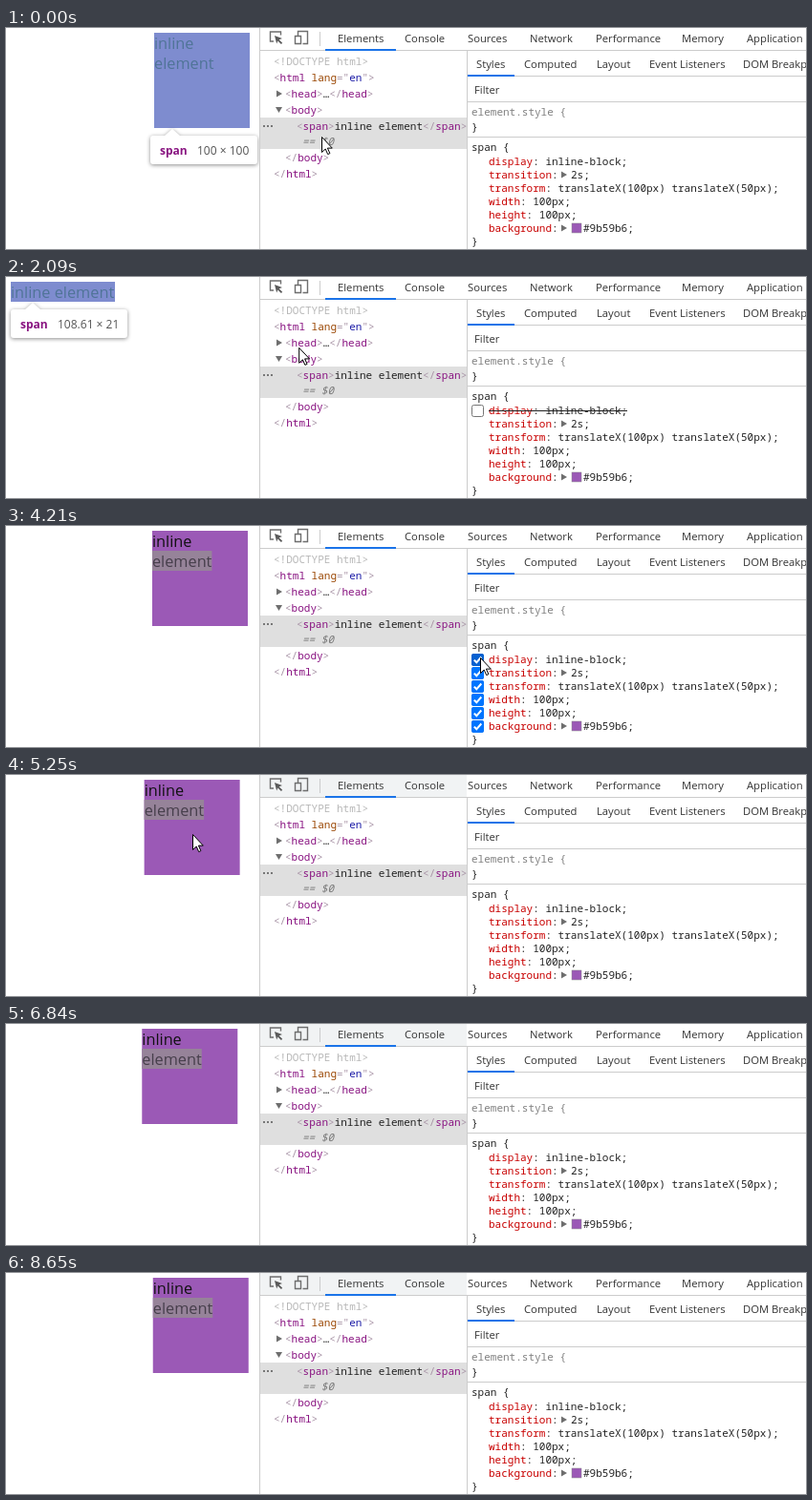
Recreate the animation shown at these times as an HTML page. Size 837 px wide and 232 px high, loop 8750 ms.

```html
<!DOCTYPE html>
<html lang="en">
<head>
<meta charset="utf-8">
<style>
  html, body { margin: 0; width: 100%; height: 100%; overflow: hidden; background: #fff; }
  svg { display: block; }
  text { white-space: pre; font: 11.25px "Open Sans", sans-serif; fill: #333; }
  .code { font: 11px "Noto Sans Mono", monospace; fill: #222; }
  .page { font-size: 16.3px; fill: #111; }
  .tip { font-size: 12px; fill: #555; }
  .bold { font-weight: bold; fill: #881280; }
  .bracket { fill: #a894a6; }
  .tag { fill: #881280; }
  .attr { fill: #994500; }
  .value { fill: #1a1aa6; }
  .prop { fill: #c80000; }
  .dim { fill: #808080; }
  .doctype { fill: #b8b8b8; }
  .note { fill: #777; font-style: italic; }
  .tooltip { filter: drop-shadow(0 1px 2px rgba(0, 0, 0, .45)); }
  .selection, .tint { display: none; }
  .selected .selection, .inspected .tint { display: inline; }
  .selected .word { fill: #463e4b; }
</style>
</head>
<body>
<svg id="stage" width="837" height="232" viewBox="0 0 837 232"></svg>
<script>
const LOOP = 8750, REST = 155, HOVERED = 105;
const stage = document.getElementById('stage');

// Markup helpers
const rect = (x, y, w, h, fill, more = '') =>
  `<rect x="${x}" y="${y}" width="${w}" height="${h}" fill="${fill}" ${more}/>`;
const path = (d, fill, more = '') => `<path d="${d}" fill="${fill}" ${more}/>`;
const label = (x, y, s, cls = '') => `<text x="${x}" y="${y}" class="${cls}">${s}</text>`;
const code = (x, y, s, cls = '') => label(x, y, s, 'code ' + cls);
const tok = (cls, s) => `<tspan class="${cls}">${s}</tspan>`;
const tag = (name, attrs = '') => {
  const close = name[0] === '/' ? '/' : '';
  return tok('bracket', '&lt;' + close) + tok('tag', name.slice(close.length)) + attrs + tok('bracket', '&gt;');
};
const right = (x, y) => path(`M${x} ${y - 3.5}l6 3.5l-6 3.5z`, '#6e6e6e');
const down = (x, y) => path(`M${x} ${y - 3}h7l-3.5 6z`, '#6e6e6e');

const toolbar = () =>
  rect(265, 0, 217, 23, '#f1f3f4', 'id="shade"') +
  rect(265, 23, 572, 1, '#ccc') + rect(483, 50, 354, 1, '#ccc') +
  rect(334, 22, 74, 2, '#1a73e8') + rect(483, 49, 49, 2, '#1a73e8') +
  path('M280 14h-3.500v-10h11v3.500', 'none', 'stroke="#6e6e6e" stroke-width="1.400"') +
  path('M281 8l8 3l-3.300 1.200l3.500 3.500l-1.300 1.300l-3.500-3.500l-1.200 3z', '#5a5a5a') +
  path('M305.500 8v-4.500h10v13h-5M302.500 8.500h6v8h-6z', 'none', 'stroke="#6e6e6e" stroke-width="1.400"') +
  rect(328, 4, 1, 15, '#ccc') +
  [[347, 'Elements'], [417, 'Console'], [483, 'Sources'], [548, 'Network'], [617, 'Performance'],
   [707, 'Memory'], [775, 'Application']].map(([x, s]) => label(x, 15, s)).join('') +
  [[492, 'Styles'], [542, 'Computed'], [618, 'Layout'], [673, 'Event Listeners'],
   [771, 'DOM Breakpoints']].map(([x, s]) => label(x, 42, s)).join('');

const tree = () =>
  rect(266, 94, 216, 33, '#dfdfdf') +
  code(280, 39, '&lt;!DOCTYPE html&gt;', 'doctype') +
  code(280, 56, tag('html', tok('attr', ' lang') + tok('bracket', '="') + tok('value', 'en') + tok('bracket', '"'))) +
  right(283, 69) + code(292, 73, tag('head') + '…' + tag('/head')) +
  down(282, 86) + code(292, 90, tag('body')) +
  [269, 273, 277].map(x => rect(x, 102, 2, 2, '#777')).join('') +
  code(304, 107, tag('span') + 'inline element' + tag('/span')) +
  code(310, 123, '== $0', 'note') +
  code(292, 140, tag('/body')) + code(280, 157, tag('/html'));

const rules = [['display', 'inline-block'], ['transition', '2s', 591],
  ['transform', 'translateX(100px) translateX(50px)'], ['width', '100px'], ['height', '100px'],
  ['background', '#9b59b6', 604]];

const checkbox = (i) => `<g id="check${i}">` +
  rect(487.5, 134.5 + 14 * i, 12, 12, '#fff', 'rx="2" stroke="#767676"') +
  `<g id="tick${i}">` + rect(487, 134 + 14 * i, 13, 13, i ? '#0075ff' : '#0560d0', 'rx="2"') +
  path(`M489.800 ${140.6 + 14 * i}l2.500 2.700l5-5.800`, 'none', 'stroke="#fff" stroke-width="2"') + '</g></g>';

const styles = () =>
  rect(482, 24, 1, 208, '#ccc') + label(490, 69, 'Filter') + rect(483, 77, 354, 1, '#ccc') +
  code(487, 92, 'element.style {', 'dim') + code(487, 108, '}') + rect(483, 114, 354, 1, '#ccc') +
  code(487, 129, 'span {') +
  rules.map(([name, value, x], i) => {
    const y = 144 + 14 * i, prop = tok('prop', name) + ':';
    return checkbox(i) + (x
      ? code(505, y, prop) + right(581, y - 4) + code(x, y, value + ';')
      : code(505, y, `${prop} ${value};`));
  }).join('') +
  rect(592, 205, 10, 10, '#9b59b6', 'stroke="#888" stroke-width=".5"') +
  rect(505, 140, 145, 1, '#222', 'id="strike"') + code(487, 228, '}');

const tooltip = (id, x, y, w, size) => `<g id="${id}" class="tooltip" transform="translate(${x} ${y})">` +
  path(`M3 0h12l8-7l8 7h${w - 34}q3 0 3 3v24q0 3-3 3h-${w - 6}q-3 0-3-3v-24q0-3 3-3z`, '#fff') +
  label(10, 20, 'span', 'tip bold') + label(49, 20, size, 'tip') + '</g>';

const tint = (x, w, h) => rect(x, 5, w, h, 'rgba(111,168,220,.66)', 'class="tint"');
const selection = (x, y) => rect(x, y, 62.5, 21, '#968399', 'class="selection"');
const word = tok('word', 'element');

stage.innerHTML =
  '<g id="block">' + rect(0, 5, 100, 100, '#9b59b6') + selection(0, 26) +
  label(0, 22, 'inline', 'page') + label(0, 43, word, 'page') + tint(0, 100, 100) + '</g>' +
  '<g id="inline">' + rect(5, 5, 109, 21, '#9b59b6') + selection(51, 5) +
  label(5, 22, 'inline ' + word, 'page') + tint(5, 109, 21) + '</g>' +
  tooltip('blockTip', 151, 113, 112, '100 × 100') + tooltip('inlineTip', 5, 34, 122, '108.61 × 21') +
  rect(265, 0, 572, 232, '#fff') + toolbar() + tree() + styles() + rect(265, 0, 1, 232, '#ccc') +
  '<g id="cursor">' +
  path('M.5 .5v16l3.700-3.500l2.500 5.600l2.200-1l-2.500-5.500h4.900z', '#fff', 'id="arrow" stroke="#000"') +
  path('M-3-8h2l1 1l1-1h2M0-7v14M-3 8h2l1-1l1 1h2', 'none', 'id="beam" stroke="#000"') + '</g>';

const byId = id => document.getElementById(id);
const show = (id, on) => byId(id).setAttribute('visibility', on ? 'visible' : 'hidden');
const within = (t, a, b) => t >= a && t < b;

// CSS "ease": cubic-bezier(.25, .1, .25, 1)
function ease(x) {
  if (x >= 1) return 1;
  let lo = 0, hi = 1, s;
  for (let i = 0; i < 24; i++) {
    s = (lo + hi) / 2;
    if (.75 * s * (1 - s) + s ** 3 < x) lo = s; else hi = s;
  }
  return .3 * s * (1 - s) ** 2 + 3 * s * s * (1 - s) + s ** 3;
}

// Two-second hover transition; reversing midway shortens the way back
const hoverFlips = [2350, 3200, 4930, 6105, 6960, 7570];
function blockX(t) {
  let from = REST, to = REST, start = -1e4, factor = 1;
  const progress = at => ease((at - start) / (2000 * factor));
  for (const flip of hoverFlips) {
    if (t < flip) break;
    const p = progress(flip);
    from += (to - from) * p;
    to = to === REST ? HOVERED : REST;
    factor = p * factor + 1 - factor;
    start = flip;
  }
  return from + (to - from) * progress(t);
}

// Pointer stops: time, x, y
const stops = [[0, 330, 114], [30, 330, 114], [150, 340, 113], [610, 340, 113], [720, 590, 150], [810, 502, 143],
  [990, 501, 143], [1290, 501, 143], [1300, 497, 139], [1910, 497, 139], [2090, 307, 74], [2350, 95, 22],
  [2420, 78, 14], [3130, 78, 14], [3200, 120, 30], [3400, 538, 130], [3550, 496, 138], [4710, 496, 138],
  [4770, 564, 120], [4930, 215, 65], [5100, 195, 62], [6070, 195, 62], [6150, 202, 143],
  [6890, 200, 207], [6960, 198, 104], [7100, 198, 61], [7510, 198, 61], [7630, 247, 121], [LOOP, 247, 121]];
function pointer(t) {
  const i = stops.findIndex(s => s[0] > t);
  const [t0, x0, y0] = stops[i - 1], [t1, x1, y1] = stops[i];
  const k = (t - t0) / (t1 - t0);
  return [x0 + (x1 - x0) * k, y0 + (y1 - y0) * k];
}

function draw(now) {
  const t = now % LOOP;
  const inline = within(t, 1500, 3760);
  const inspected = t < 680 || within(t, 2000, 2200);
  const editing = within(t, 690, 1980) || within(t, 3400, 4760);
  const beam = within(t, 2360, 3170);

  stage.classList.toggle('inspected', inspected);
  stage.classList.toggle('selected', t >= 3040);
  byId('block').setAttribute('transform', `translate(${blockX(t)} 0)`);
  show('block', !inline);
  show('inline', inline);
  show('blockTip', inspected && !inline);
  show('inlineTip', inspected && inline);
  show('shade', t >= 4800);

  rules.forEach((_, i) => {
    const disabled = i === 0 && inline;
    show('check' + i, editing || disabled);
    show('tick' + i, editing && !disabled);
  });
  show('strike', inline);

  const present = !within(t, 6180, 6890) && t < 7680;
  byId('cursor').setAttribute('transform', `translate(${pointer(t)})`);
  show('arrow', present && !beam);
  show('beam', beam);
}

const begin = performance.now();
function tick() {
  draw(performance.now() - begin);
  requestAnimationFrame(tick);
}
tick();
</script>
</body>
</html>
```
